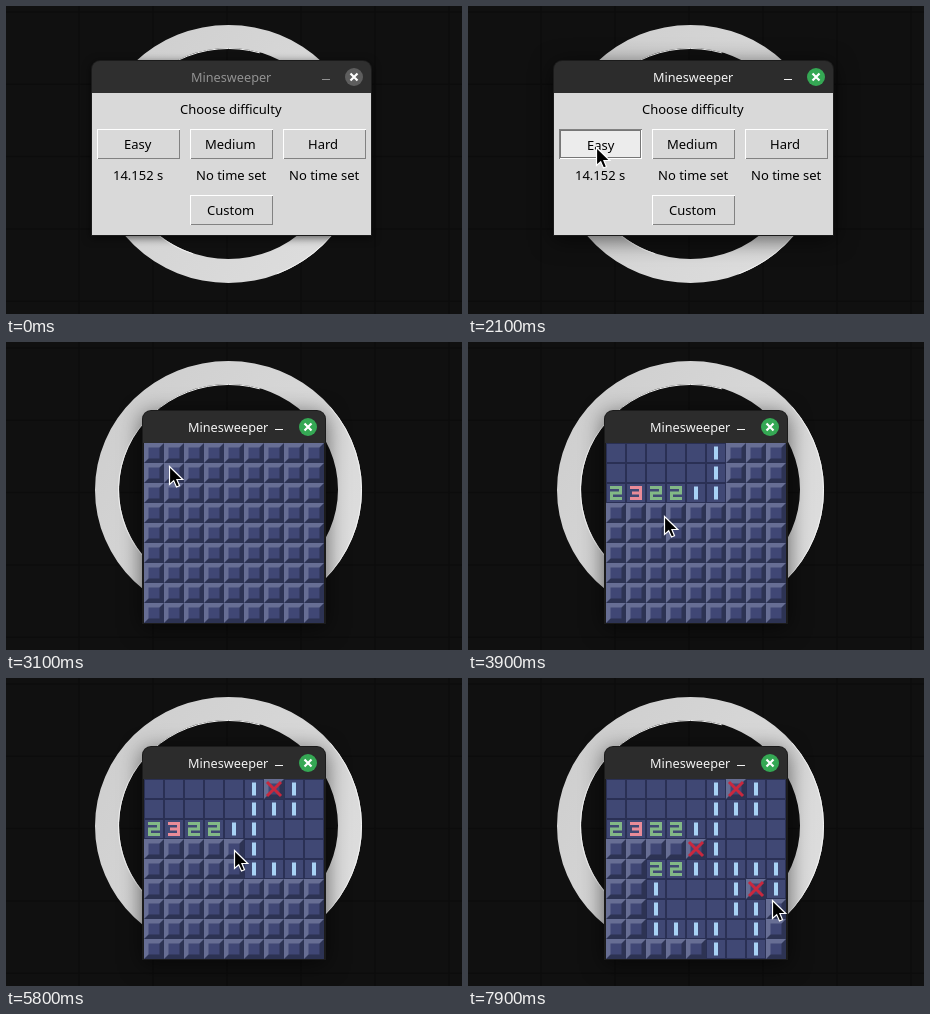
An HTML page with a canvas that plays this animation: 456x308 px, repeating every 8 s.

```html
<!DOCTYPE html>
<html>
<head>
<meta charset="utf-8">
<title>Minesweeper</title>
<style>
html, body { margin: 0; width: 100%; height: 100%; overflow: hidden; background: #101010; }
canvas { display: block; }
</style>
</head>
<body>
<canvas id="stage" width="456" height="308"></canvas>
<script>
const ctx = document.getElementById('stage').getContext('2d');
const LOOP = 8000, STEP = 100;
const CELL = 20, SIZE = 9, GRID_X = 138, GRID_Y = 101;
const DIALOG_END = 2200, GAME_START = 2300, GAME_READY = 2400;

// Mines as "row column" pairs; numbers and opened areas follow from them.
const mines = new Set('06 30 31 32 34 57 61 84 88'.split(' '));

// Pointer stops: arrival time, x, y and what the click there does
const stops = [
  [400, 150, 282], [1100, 128, 141], [2800, 163, 130], [3100, 163, 124, 'open'],
  [3800, 196, 174], [4300, 262, 158, 'open'], [4500, 269, 136], [5000, 268, 112, 'flag'],
  [5400, 230, 183], [5800, 228, 172, 'flag'], [6500, 232, 206, 'open'],
  [7200, 282, 209, 'flag'], [7600, 304, 212, 'open'], [7900, 304, 222]
];

const openedAt = {}, flaggedAt = {};

function neighbours(r, c) {
  const list = [];
  for (let y = Math.max(r - 1, 0); y <= Math.min(r + 1, SIZE - 1); y++)
    for (let x = Math.max(c - 1, 0); x <= Math.min(c + 1, SIZE - 1); x++) list.push([y, x]);
  return list;
}

const mineCount = (r, c) => neighbours(r, c).filter(([y, x]) => mines.has(`${y}${x}`)).length;

function open(r, c, time) {
  if (`${r}${c}` in openedAt) return;
  openedAt[`${r}${c}`] = time;
  if (!mineCount(r, c)) neighbours(r, c).forEach(([y, x]) => open(y, x, time));
}

for (const [time, x, y, action] of stops) {
  const r = Math.floor((y - GRID_Y) / CELL), c = Math.floor((x - GRID_X) / CELL);
  if (action === 'open') open(r, c, time);
  if (action === 'flag') flaggedAt[`${r}${c}`] = time;
}

function rect(x, y, w, h, color) {
  ctx.fillStyle = color;
  ctx.fillRect(x, y, w, h);
}

function fill(path, color) {
  ctx.fillStyle = color;
  ctx.fill(new Path2D(path));
}

function stroke(path, color, width) {
  ctx.strokeStyle = color;
  ctx.lineWidth = width;
  ctx.stroke(new Path2D(path));
}

function text(str, centerX, y, color = '#000', size = 13) {
  ctx.font = `${size}px "Noto Sans", "Open Sans", sans-serif`;
  ctx.fillStyle = color;
  ctx.fillText(str, Math.round(centerX - ctx.measureText(str).width / 2), y);
}

function arc(rx, ry, from, to, color) {
  ctx.beginPath();
  ctx.ellipse(222.5, 148, rx, ry, 0, from, to);
  ctx.strokeStyle = color;
  ctx.lineWidth = 1;
  ctx.stroke();
}

function wallpaper() {
  rect(0, 0, 456, 308, '#101010');
  for (let i = 0; i < 7; i++)
    stroke(`M${i * 74 - 1} 0V308M0 ${i * 72.3 + 6}H456`, '#0c0c0c', 1.5);
  const shade = ctx.createLinearGradient(90, 60, 356, 230);
  shade.addColorStop(0, '#cecece');
  shade.addColorStop(1, '#dedede');
  ctx.save();
  ctx.filter = 'blur(0.4px)';
  ctx.beginPath();
  ctx.ellipse(222.5, 148, 133.5, 129, 0, 0, 7);
  ctx.ellipse(222.5, 147.5, 109.5, 105.5, 0, 0, 7);
  ctx.fillStyle = shade;
  ctx.fill('evenodd');
  ctx.restore();
  arc(133, 128.5, -.7, 1.2, '#f4f4f4');
  arc(110, 105.5, 1.9, 5, '#f4f4f4');
}

function frame(x, y, w, h, title, titleX, minX, focused) {
  ctx.save();
  ctx.shadowColor = 'rgba(0,0,0,.6)';
  ctx.shadowBlur = focused ? 22 : 8;
  ctx.shadowOffsetY = focused ? 4 : 2;
  ctx.beginPath();
  ctx.roundRect(x - 1, y - 1, w + 2, h + 2, [9, 9, 0, 0]);
  ctx.fillStyle = '#1b1b1b';
  ctx.fill();
  ctx.restore();
  ctx.beginPath();
  ctx.roundRect(x, y, w, 32, [8, 8, 0, 0]);
  ctx.fillStyle = focused ? '#2c2c2c' : '#2f2f2f';
  ctx.fill();
  const ink = focused ? '#f2f2f2' : '#929292';
  text(title, titleX, y + 21, ink, 12.7);
  rect(minX, y + 18, 8, 1, ink);
  const cx = x + w - 17, cy = y + 16;
  ctx.beginPath();
  ctx.arc(cx, cy, 9, 0, 7);
  ctx.fillStyle = focused ? '#35a854' : '#5e5e5e';
  ctx.fill();
  stroke(`M${cx - 3.5} ${cy - 3.5}l7 7m0 -7l-7 7`, '#fff', 2.2);
}

function button(label, x, y, state = '') {
  const pressed = state === 'pressed';
  rect(x, y, 83, 30, pressed ? '#828282' : '#fff');
  rect(x + 1, y + 1, 82, 29, pressed ? '#fff' : '#828282');
  rect(x + 1, y + 1, 81, 28, state ? '#ececec' : '#d9d9d9');
  if (pressed) {
    ctx.setLineDash([1, 1]);
    ctx.lineDashOffset = 1;
    ctx.strokeStyle = '#000';
    ctx.lineWidth = 1;
    ctx.strokeRect(x + 1.5, y + 1.5, 80, 27);
    ctx.setLineDash([]);
  }
  const shift = pressed ? 1 : 0;
  text(label, x + 40.5 + shift, y + 20 + shift);
}

function dialog(t) {
  frame(86, 55, 279, 174, 'Minesweeper', 225, 316, t >= 2100);
  rect(86, 87, 279, 142, '#d9d9d9');
  text('Choose difficulty', 225, 108);
  ['Easy', 'Medium', 'Hard'].forEach((level, i) => {
    const x = 91 + i * 93;
    const state = i ? '' : t >= 2100 ? 'pressed' : t >= 900 ? 'hover' : '';
    button(level, x, 123, state);
    text(i ? 'No time set' : '14.152 s', x + 41.5, 174);
  });
  button('Custom', 184, 189);
}

function covered(x, y) {
  rect(x, y, CELL, CELL, '#2d3353');
  fill(`M${x} ${y}h20l-4 4l-12 12l-4 4z`, '#676e94');
  rect(x + 4.5, y + 4.5, 11, 11, '#404775');
}

function digit(n, x, y) {
  if (n === 1) rect(x + 8, y + 3.5, 4, 13, '#a8d2f5');
  if (n === 2) stroke(`M${x + 4} ${y + 4.5}h10.5v5.5h-9v5.5h10.5`, '#82b886', 3);
  if (n === 3) stroke(`M${x + 4} ${y + 4.5}h10.5v11h-10.5m2 -5.5h8`, '#ea8b98', 3);
}

function cell(r, c, t) {
  const x = GRID_X + c * CELL, y = GRID_Y + r * CELL, key = `${r}${c}`;
  if (t > openedAt[key]) {
    rect(x, y, CELL, CELL, '#2a3054');
    rect(x + 1, y + 1, CELL - 2, CELL - 2, '#404874');
    digit(mineCount(r, c), x, y);
    return;
  }
  covered(x, y);
  if (t > flaggedAt[key]) stroke(`M${x + 3} ${y + 3}l14 14m0 -14l-14 14`, '#c8283e', 3);
}

function game(t) {
  if (t < GAME_READY) {
    frame(136, 69, 182, 212, 'pygame window', 212, 268, false);
    rect(136, 101, 182, 180, '#000');
    return;
  }
  frame(137, 69, 182, 212, 'Minesweeper', 222, 269, true);
  for (let r = 0; r < SIZE; r++)
    for (let c = 0; c < SIZE; c++) cell(r, c, t);
}

// Each hop ends at its stop's time and takes longer the farther it goes.
function pointerAt(t) {
  const next = stops.findIndex(stop => stop[0] > t);
  if (next < 0) return stops.at(-1).slice(1, 3);
  const [t0, x0, y0] = stops[next - 1], [t1, x1, y1] = stops[next];
  const travel = Math.min(t1 - t0, 150 + 3.6 * Math.hypot(x1 - x0, y1 - y0));
  const k = Math.max(0, 1 - (t1 - t) / travel), eased = k * k * (3 - 2 * k);
  return [x0 + (x1 - x0) * eased, y0 + (y1 - y0) * eased];
}

function pointer(t) {
  if (t < stops[0][0]) return;
  const [x, y] = pointerAt(t);
  const overWindow = t < DIALOG_END ? y < 229 : x >= 137;
  const arrow = overWindow
    ? 'M0 0V18L4.2 14.2L7 20.5L10 19.2L7.4 13H13.3Z'
    : 'M0 0V20L5.5 14.5L13.5 13.5Z';
  ctx.save();
  ctx.translate(x + .5, y + .5);
  fill(arrow, '#000');
  stroke(arrow, '#fff', 1.2);
  ctx.restore();
}

function draw(now) {
  const t = Math.floor(now % LOOP / STEP) * STEP;
  wallpaper();
  if (t < DIALOG_END) dialog(t);
  else if (t >= GAME_START) game(t);
  pointer(t);
  requestAnimationFrame(draw);
}
requestAnimationFrame(draw);
</script>
</body>
</html>
```
